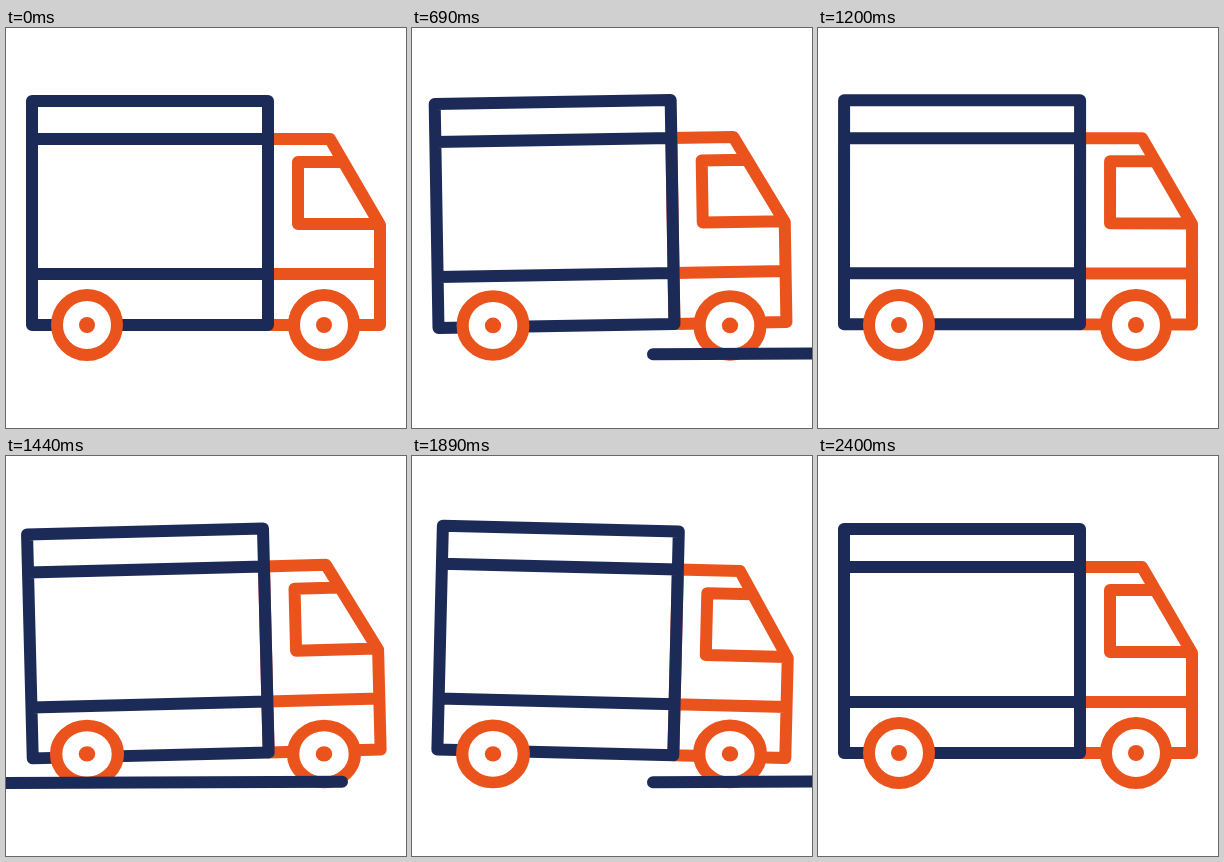
Write an HTML page that moves like this. It is 400 px wide and 400 px high and loops after 2.43 s.

```html
<!DOCTYPE html>
<html lang="en">
<head>
<meta charset="utf-8">
<title>Delivery truck</title>
<style>
  html, body { margin: 0; width: 100%; height: 100%; overflow: hidden; background: #fff; }
  svg { display: block; width: 100%; height: 100%; }
  .ink { fill: none; stroke-width: 12; stroke-linecap: round; stroke-linejoin: round; }
  .navy { stroke: #1c2a57; }
  .orange { stroke: #eb531d; }
  .wheel { fill: #fff; }
  .hub { fill: #eb531d; }
</style>
</head>
<body>
<svg viewBox="0 0 400 400">
  <g id="body">
    <path class="ink orange" d="M262 111H324L374 197V297H262ZM262 246H374M337 134H292V196H373"/>
    <path class="ink navy" d="M26 73H262V297H26ZM26 111H262M26 246H262"/>
  </g>
  <g class="axle">
    <circle class="ink orange wheel" r="30"/>
    <circle class="hub" r="8"/>
  </g>
  <g class="axle">
    <circle class="ink orange wheel" r="30"/>
    <circle class="hub" r="8"/>
  </g>
  <path id="road" class="ink navy"/>
</svg>
<script>
const LOOP = 2430, STEP = 30, END = 2400;
const body = document.getElementById('body');
const road = document.getElementById('road');
const axles = document.querySelectorAll('.axle');
const axleX = [81, 318];

// Sway keys: [time, tilt from -1 to 1]
const sway = [[0, 0], [180, 1], [580, -1], [985, 1], [1420, -1], [1855, 1], [2215, -1], [END, 0]];

function tiltAt(t) {
  for (let i = 1; i < sway.length; i++) {
    const [t0, a] = sway[i - 1], [t1, b] = sway[i];
    if (t <= t1) return a + (b - a) * (1 - Math.cos(Math.PI * (t - t0) / (t1 - t0))) / 2;
  }
  return 0;
}

function drawRoad(t) {
  const phase = t % 600, speed = 2.95;
  const head = Math.max(-20, 241 - speed * (phase - 90));
  const tail = Math.min(420, 336 - speed * (phase - 240));
  const visible = head < 407 && tail > -7;
  const y = x => 325.5 + (400 - x) * 0.004;
  road.setAttribute('d', visible ? `M${tail} ${y(tail)}L${head} ${y(head)}` : '');
}

function render(t) {
  const tilt = tiltAt(t), press = tilt * tilt;
  const lift = 0.7 * Math.max(0, Math.min(1, t / 100, (END - t) / 100));
  body.setAttribute('transform', `translate(0 ${1.7 * press - lift}) rotate(${1.47 * tilt} 200 270)`);
  axles.forEach((axle, i) => axle.setAttribute('transform',
    `translate(${axleX[i]} ${297 + press}) scale(${1 + 0.03 * press} ${1 - 0.05 * press})`));
  drawRoad(t);
}

const start = performance.now();
function tick() {
  const t = (performance.now() - start) % LOOP;
  render(Math.floor(t / STEP) * STEP);
  requestAnimationFrame(tick);
}
render(0);
requestAnimationFrame(tick);
</script>
</body>
</html>
```
